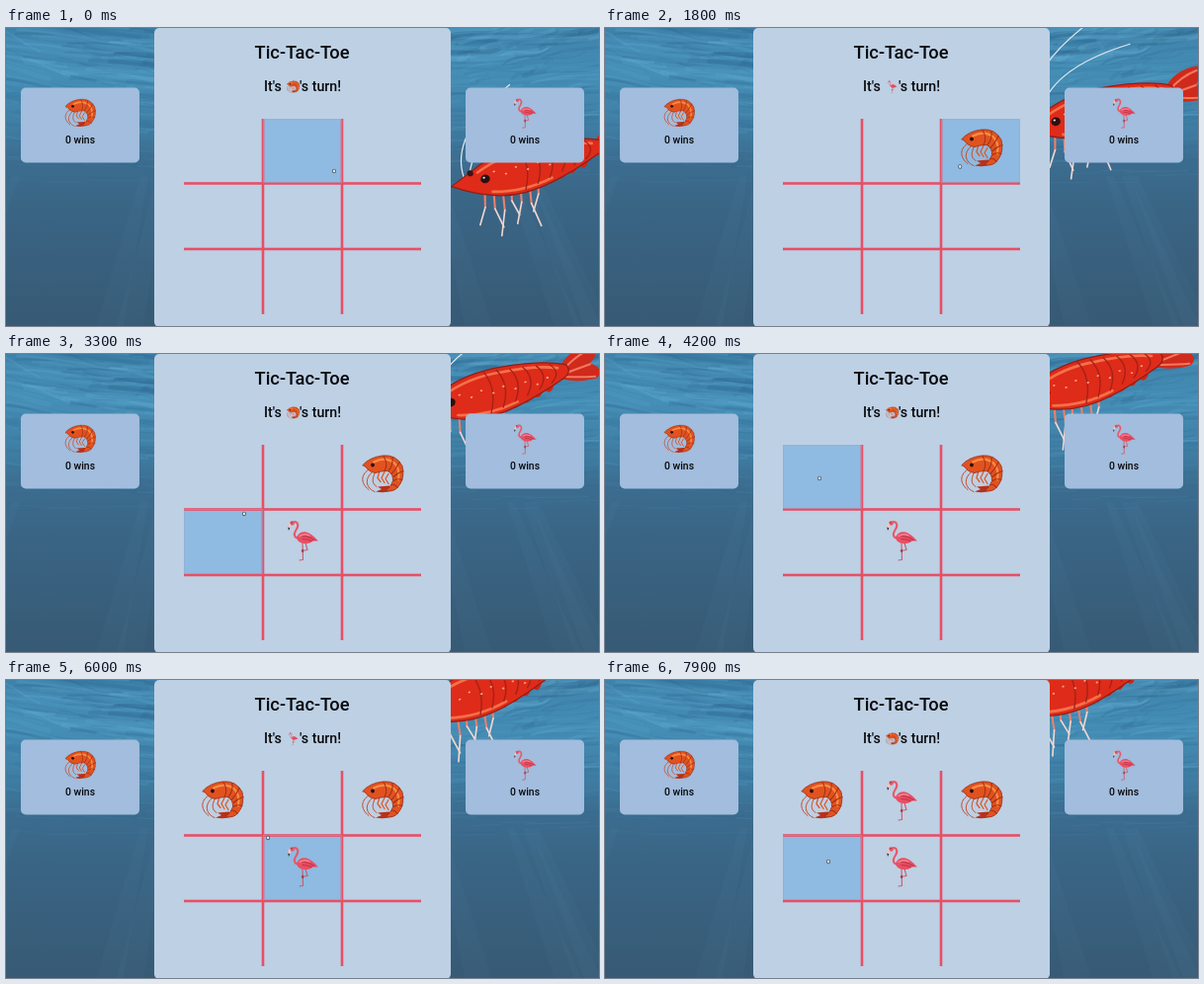
An HTML page with a canvas for the animation above (8 s loop, 600 px wide and 302 px high).

```html
<!DOCTYPE html>
<html lang="en">
<head>
<meta charset="utf-8">
<title>Tic-Tac-Toe</title>
<style>
html, body { margin: 0; width: 100%; height: 100%; overflow: hidden; background: #365a7c; }
canvas { display: block; width: 600px; height: 302px; }
</style>
</head>
<body>
<canvas id="stage" width="600" height="302"></canvas>
<script>
const W = 600, H = 302, LOOP = 8000;
const ctx = document.getElementById('stage').getContext('2d');

// time, x, y
const cursorKeys = [
  [0, 332, 145], [300, 334, 143], [900, 374, 130], [1700, 374, 130],
  [2200, 301, 182], [2800, 301, 182], [3300, 241, 162], [3900, 217, 126],
  [4500, 217, 126], [5000, 229, 190], [5700, 229, 190], [6300, 301, 130],
  [7000, 301, 130], [7600, 226, 184], [8000, 226, 184]
];
// time, eye x, eye y, angle
const swimKeys = [
  [0, 485, 153, -0.25], [1100, 461, 104, -0.14], [2400, 452, 87, -0.3],
  [3300, 450, 49, -0.24], [5200, 441, 29, -0.29], [6800, 436, 23, -0.3], [8000, 433, 20, -0.3]
];
// time, column, row; players alternate
const moves = [[1500, 2, 0], [2700, 1, 1], [4300, 0, 0], [6500, 1, 0]];
const colX = [180, 260, 340, 420], rowY = [92, 157.5, 224, 290];

function sample(keys, t) {
  let i = 0;
  while (i < keys.length - 2 && t >= keys[i + 1][0]) i++;
  const a = keys[i], b = keys[i + 1];
  const k = Math.min(1, (t - a[0]) / (b[0] - a[0]));
  return a.slice(1).map((v, n) => v + (b[n + 1] - v) * k);
}

function line(c, d, color, width) {
  c.strokeStyle = color;
  c.lineWidth = width;
  c.stroke(new Path2D(d));
}

function fill(c, d, color) {
  c.fillStyle = color;
  c.fill(new Path2D(d));
}

function oval(c, x, y, rx, ry, color, angle = 0) {
  c.fillStyle = color;
  c.beginPath();
  c.ellipse(x, y, rx, ry, angle, 0, 7);
  c.fill();
}

function box(x, y, w, h, r, color) {
  ctx.fillStyle = color;
  ctx.beginPath();
  ctx.roundRect(x, y, w, h, r);
  ctx.fill();
}

function at(x, y, scale, angle, draw) {
  ctx.save();
  ctx.translate(x, y);
  ctx.rotate(angle);
  ctx.scale(scale, scale);
  ctx.lineCap = ctx.lineJoin = 'round';
  draw();
  ctx.restore();
}

function makeSea() {
  const sea = document.createElement('canvas');
  sea.width = W;
  sea.height = H;
  const c = sea.getContext('2d');
  const g = c.createLinearGradient(0, 0, 0, H);
  [[0, '#3e82aa'], [0.16, '#458eb6'], [0.34, '#3f7ca2'], [0.44, '#3b6d90'], [0.6, '#3a6585'], [1, '#375a75']]
    .forEach(s => g.addColorStop(...s));
  c.fillStyle = g;
  c.fillRect(0, 0, W, H);

  let seed = 11;
  const rnd = () => (seed = seed * 16807 % 2147483647) / 2147483647;
  c.lineCap = 'round';
  for (let i = 0; i < 520; i++) {
    const y = 160 * Math.pow(rnd(), 1.2), x = rnd() * W;
    const depth = 1 - y / 162, len = 12 + rnd() * (15 + 55 * depth);
    const tilt = (300 - x) / 300 * (4 + rnd() * 10) * depth;
    c.strokeStyle = rnd() < 0.5 ? '#6cb6dc' : '#265a80';
    c.globalAlpha = 0.04 + 0.2 * rnd() * Math.sqrt(depth);
    c.lineWidth = 0.8 + 6 * depth * rnd();
    c.beginPath();
    c.moveTo(x - len, y - tilt);
    c.bezierCurveTo(x - len / 3, y - 7 * depth, x + len / 3, y + 7 * depth, x + len, y + tilt);
    c.stroke();
  }
  for (let i = 0; i < 12; i++) {
    const x = rnd() * W, d = (x - 300) * 0.25;
    c.globalAlpha = 0.025;
    fill(c, `M${x} 150 L${x + 8} 150 L${x + d + 24} 302 L${x + d - 4} 302Z`, '#8cc0dc');
  }
  return sea;
}

function swimmer(t) {
  const [x, y, angle] = sample(swimKeys, t);
  at(x, y, 1.03, angle, () => {
    line(ctx, 'M-14 -8 Q2 -52 88 -58 M-20 -6 Q-24 -50 46 -84', '#e3e9ec', 1.2);
    for (let i = 0; i < 7; i++) {
      const a = -4 + i * 9, k = 22 + i % 3 * 6, side = i % 2 ? 4 : -9;
      line(ctx, `M${a} 14 l-3 ${k * 0.6}`, '#e8816f', 2);
      line(ctx, `M${a - 3} ${14 + k * 0.6} l${side} ${k * 0.7}`, '#f1d6d0', 1.6);
    }
    for (let i = 0; i < 4; i++) oval(ctx, 62 + i * 12, 15 - i * 2.5, 4, 6, '#c8281b', 0.5);
    fill(ctx, 'M112 -8 Q126 -24 148 -22 Q154 -12 142 -5 Q156 4 145 11 Q124 11 110 3Z', '#cf2a1c');
    line(ctx, 'M114 -4 Q130 -16 146 -18 M116 -1 L142 -4 M114 2 Q132 7 144 9', '#f4785c', 2);
    const shell = 'M-34 -1 L-8 -12 Q20 -25 58 -22 Q98 -19 119 -9 Q123 0 112 4 Q86 14 64 19 Q30 27 2 17 Q-16 11 -34 -1Z';
    fill(ctx, shell, '#df2b19');
    line(ctx, shell, '#8e1e18', 1.2);
    line(ctx, 'M-6 -8 Q24 -20 54 -17 Q88 -16 110 -8 M4 14 Q34 22 64 15', '#f4714a', 2.6);
    for (let i = 0; i < 6; i++) {
      const a = 38 + i * 13;
      line(ctx, `M${a} ${-22 + i * 1.8} Q${a + 10} -3 ${a - 2} ${20 - i * 3}`, '#a32219', 1.3);
    }
    for (let i = 0; i < 9; i++) oval(ctx, 10 + i * 11, -5 + i * 5 % 9, 1.2, 0.9, '#f9a284');
    oval(ctx, -13, -9, 3, 3, '#3b1516');
    oval(ctx, 0, 0, 4.6, 4.2, '#2b1012');
    oval(ctx, -1, -1.5, 1.2, 1, '#e9d5cf');
  });
}

// Icons are drawn around their centres, about 40 units tall.
function shrimp(x, y, scale) {
  at(x, y, scale, 0, () => {
    line(ctx, 'M-13 -5 C-22 0 -23 9 -14 16 M-9 -3 C-20 5 -16 15 -8 18 M-7 -3 C-10 4 -12 9 -6 13', '#c94725', 1);
    line(ctx, 'M-3 -3 L-5 4 L-2 8 M2 -2 L-1 4 L2 9 M6 0 L3 5 L6 10', '#dd5827', 1.3);
    fill(ctx, 'M7 12 L-5 13 L-1 15.5 L-7 18 Q2 20 9 17Z', '#b9301a');
    const shell = 'M-20 -9 Q-13 -17 0 -18.5 Q14 -20 20 -8 Q23 4 16 13 Q11 19 3 17 Q9 13 10.5 7 Q11 0 5 -3 Q-2 -3 -7 -1 Q-14 -2 -17 -7Z';
    fill(ctx, shell, '#e2521f');
    line(ctx, shell, '#992d17', 0.8);
    line(ctx, 'M-9 -12 Q3 -18 12 -11 Q18 -5 16 6', '#fb8d40', 2.2);
    line(ctx, 'M1 -18 Q6 -10 2 -3 M10 -17 Q11 -9 6 -3 M17 -12 Q14 -5 9 0 M21 -3 Q15 -1 11 3 M20 6 Q15 4 11 7 M15 14 Q13 10 9 11', '#a0341b', 1.1);
    oval(ctx, -10, -9, 1.9, 1.9, '#2a1414');
  });
}

function flamingo(x, y, scale) {
  at(x, y, scale, 0, () => {
    line(ctx, 'M0 3 L0.5 20 L-3 20.5 M3 3 L5 10 L-1 11', '#cf5968', 1.1);
    line(ctx, 'M0.2 10 L0.3 12', '#8a3a4a', 1.6);
    line(ctx, 'M-11 -17 C-6 -21 -3 -16 -6 -11 C-10 -5 -8 -1 -2 -2', '#e8596a', 2.2);
    oval(ctx, -10.5, -17, 2.4, 2.2, '#e8596a');
    fill(ctx, 'M-13 -18 Q-15.5 -15 -14 -10.5 L-11.5 -14.5Z', '#f3c3bd');
    fill(ctx, 'M-14.7 -13 L-14 -9.5 L-12.7 -12Z', '#262026');
    fill(ctx, 'M-6 -3 Q-3 -9 4 -8 Q10 -6 16 1 L11 1 Q6 5 -1 3 Q-6 1 -6 -3Z', '#e94f63');
    line(ctx, 'M0 -4 Q6 -4 12 0 M0 -1 Q5 -1 9 1', '#bd3550', 1.1);
    line(ctx, 'M-3 -4 Q2 -7 7 -4.5', '#ff8c92', 1.3);
    oval(ctx, -11, -17.7, 0.6, 0.6, '#40202a');
  });
}

function text(s, x, y, size, align = 'center') {
  ctx.fillStyle = '#08090c';
  ctx.font = `500 ${size}px Roboto, sans-serif`;
  ctx.textAlign = align;
  ctx.fillText(s, x, y);
}

function card(x, icon) {
  box(x, 60.5, 120, 76, 5, '#a2bddd');
  icon(x + 60, 86, 0.74);
  text('0 wins', x + 60, 117, 10.4);
}

function board(t) {
  const [mx, my] = sample(cursorKeys, t);
  const slot = (edges, v) => v < edges[1] ? 0 : v < edges[2] ? 1 : 2;
  const c = slot(colX, mx), r = slot(rowY, my);
  const x = colX[c], y = rowY[r], w = colX[c + 1] - x, h = rowY[r + 1] - y;
  ctx.fillStyle = '#8fbae1';
  ctx.fillRect(x, y, w, h);

  ctx.fillStyle = '#e84f66';
  for (const cx of colX.slice(1, 3)) ctx.fillRect(cx - 1.3, 92, 2.6, 198);
  for (const cy of rowY.slice(1, 3)) ctx.fillRect(180, cy - 1.3, 240, 2.6);

  ctx.setLineDash([1, 1]);
  ctx.strokeStyle = '#98a9cf';
  ctx.lineWidth = 1;
  ctx.strokeRect(x + 0.5, Math.floor(y) + 0.5, w - 1, Math.floor(h) - 1);
  ctx.setLineDash([]);

  moves.forEach(([when, col, row], i) => {
    if (t < when) return;
    const py = 121.5 + row * 67;
    if (i % 2) flamingo(219 + col * 81, py, 1);
    else shrimp(219 + col * 81, py, 1);
  });

  oval(ctx, mx, my, 2, 2.3, '#4b5762');
  oval(ctx, mx, my, 1.2, 1.4, '#e4eaf0');
}

const sea = makeSea();

function render(now) {
  const t = now % LOOP;
  ctx.drawImage(sea, 0, 0);
  swimmer(t);
  box(150, 0, 300, 303, 5, '#bdd0e4');
  card(15, shrimp);
  card(465, flamingo);

  text('Tic-Tac-Toe', 299.5, 31, 18.3);
  text("It's", 261, 64, 14.2, 'left');
  text("'s turn!", 339, 64, 14.2, 'right');
  const turn = moves.filter(m => t >= m[0]).length % 2;
  (turn ? flamingo : shrimp)(290.5, 59.5, 0.31);

  board(t);
  requestAnimationFrame(render);
}
requestAnimationFrame(render);
</script>
</body>
</html>
```
